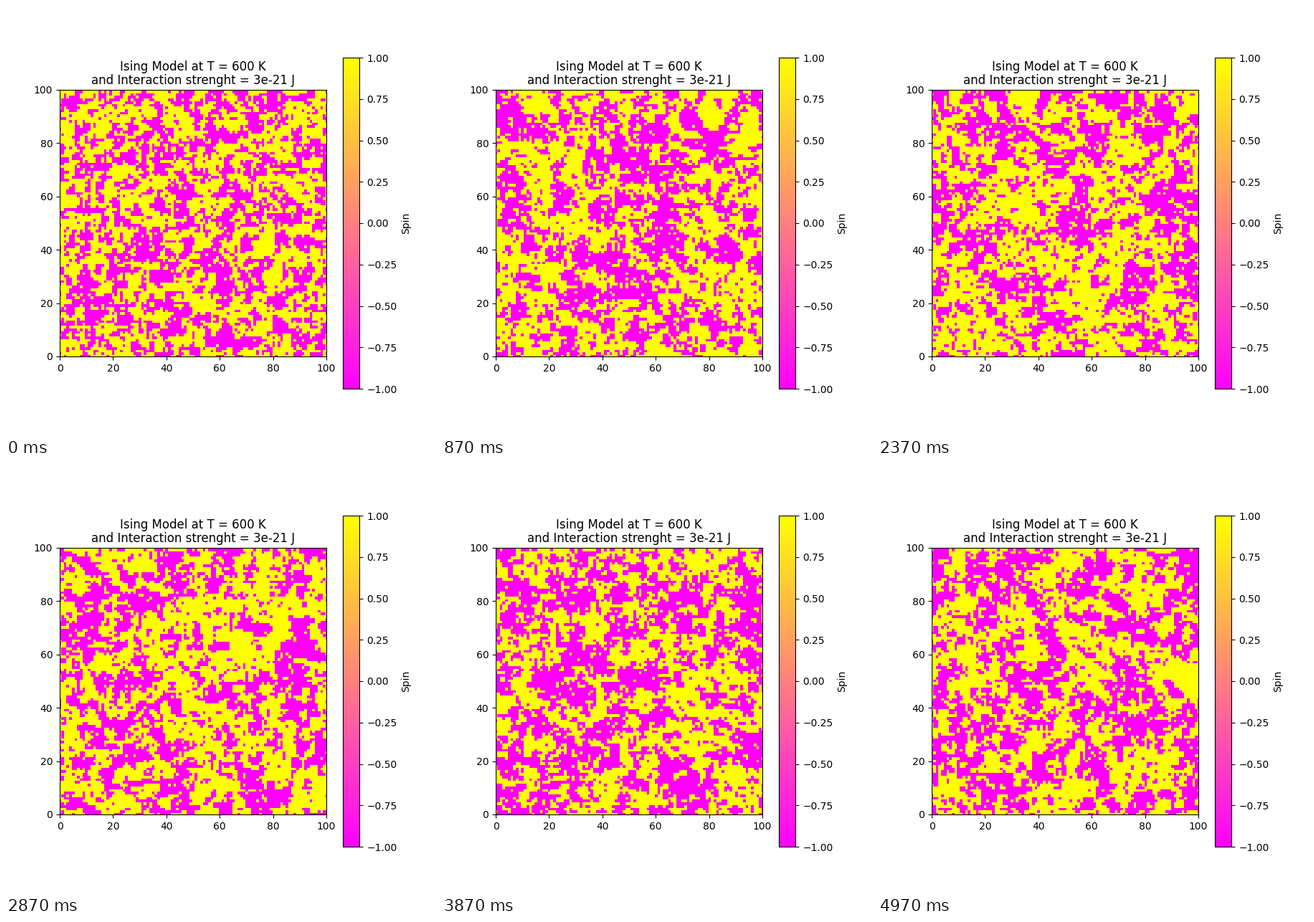
A matplotlib script that plays this animation: 600x600 px, repeating every 5000 ms.

```python
import numpy as np
import matplotlib.pyplot as plt
from matplotlib.animation import FuncAnimation

SIZE = 101            # lattice sites per side, centred on 0..100
FRAMES = 150
LOOP_MS = 5000
ROUNDS = 8            # partial updates that add up to one sweep
WARMUP = 2            # sweeps before the loop begins

T = 600               # K
J = 3e-21             # J
K = J / (1.380649e-23 * T)
BIAS = 0.005          # slight preference for spin up

rng = np.random.default_rng(14)
parity = np.indices((SIZE, SIZE)).sum(axis=0) % 2


def sweep(spins):
    """One Metropolis sweep in random partial updates of alternating sublattices."""
    spins = spins.copy()
    for i in range(ROUNDS):
        near = sum(np.roll(spins, step, axis) for step in (-1, 1) for axis in (0, 1))
        cost = 2 * spins * (K * near + BIAS)
        chosen = (parity == i % 2) & (rng.random(spins.shape) < 2 / ROUNDS)
        flip = chosen & (rng.random(spins.shape) < np.exp(-cost))
        spins[flip] *= -1
    return spins


def simulate():
    spins = rng.choice([-1, 1], size=(SIZE, SIZE), p=[0.48, 0.52])
    states = []
    for _ in range(WARMUP + FRAMES):
        spins = sweep(spins)
        states.append(spins)
    return states[WARMUP:]


states = simulate()

fig, ax = plt.subplots(figsize=(6, 6), dpi=100)
edge = SIZE - 0.5
grid = ax.imshow(states[0], cmap="spring", vmin=-1, vmax=1, origin="lower",
                 interpolation="nearest", extent=(-0.5, edge, -0.5, edge))
ax.set_xlim(0, SIZE - 1)
ax.set_ylim(0, SIZE - 1)
ax.set_xticks(range(0, SIZE, 20))
ax.set_yticks(range(0, SIZE, 20))
ax.set_title(f"Ising Model at T = {T} K\nand Interaction strenght = {J} J",
             linespacing=1.08)
fig.colorbar(grid, ax=ax, label="Spin", panchor=(0, 0.5))


def update(frame):
    grid.set_data(states[frame])
    return (grid,)


anim = FuncAnimation(fig, update, frames=FRAMES, interval=LOOP_MS / FRAMES,
                     repeat=True, repeat_delay=0)
plt.show()
```
